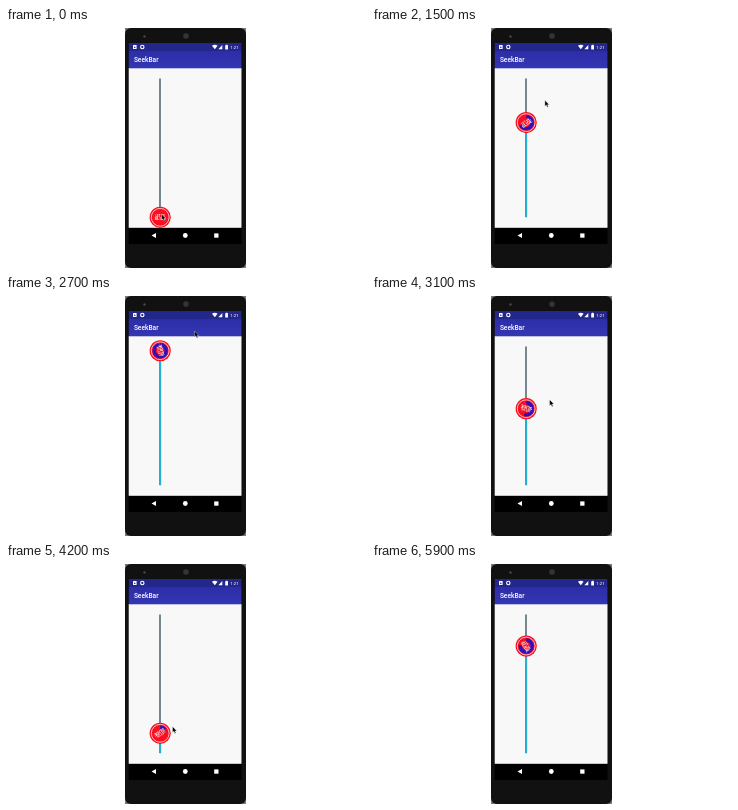
Recreate the animation shown at these times as an HTML page. Size 360 by 240 pixels, loop 6 s.

```html
<!DOCTYPE html>
<html lang="en">
<head>
<meta charset="utf-8">
<title>SeekBar</title>
<style>
  html, body { margin: 0; width: 100%; height: 100%; overflow: hidden; background: #fff; }
  svg { display: block; width: 360px; height: 240px; }
  text { font-family: Roboto, sans-serif; fill: #fff; }
</style>
</head>
<body>
<svg viewBox="0 0 360 240">
  <defs>
    <linearGradient id="bar" x2="0" y2="1">
      <stop offset="0" stop-color="#2d2da8"/>
      <stop offset="1" stop-color="#3337b3"/>
    </linearGradient>
  </defs>

  <!-- phone -->
  <rect x="119" width="121" height="240" fill="#777"/>
  <rect x="119" width="121" height="240" rx="6" fill="#111"/>
  <circle cx="138.500" cy="8.500" r="1.200" fill="#484848"/>
  <circle cx="180" cy="8" r="2.800" fill="#343434"/>
  <rect x="122.700" y="15" width="112.800" height="201" fill="#000"/>
  <rect x="122.700" y="40" width="112.800" height="159.800" fill="#f8f8f8"/>
  <rect x="122.700" y="15" width="112.800" height="8" fill="#23278c"/>
  <rect x="122.700" y="23" width="112.800" height="17.300" fill="url(#bar)"/>
  <text x="127.900" y="33.900" font-size="6.600" font-weight="500">SeekBar</text>

  <!-- status icons -->
  <g fill="#fff">
    <rect x="127" y="17" width="3.600" height="4" rx=".5"/>
    <path d="M128 20L128.800 18L129.600 20Z" fill="#23278c"/>
    <circle cx="136.300" cy="19" r="1.700" fill="none" stroke="#fff" stroke-width="1.100"/>
    <path d="M206 17.800Q208.800 15.700 211.600 17.800L208.800 21.300Z"/>
    <path d="M212.300 21.300L216.300 17V21.300Z"/>
    <path d="M219.200 17.300H220V16.700H221.300V17.300H222V21.400H219.200Z"/>
    <text x="224.300" y="20.900" font-size="4.400">1:21</text>
  </g>

  <!-- navigation -->
  <g fill="#fff">
    <path d="M145.500 207.500L150 205V210Z"/>
    <circle cx="179.300" cy="207.500" r="2.400"/>
    <rect x="208.200" y="205.400" width="4.300" height="4.300"/>
  </g>

  <!-- seek bar -->
  <path d="M154 50.500V189" stroke="#3f5663" stroke-width="1.400"/>
  <path id="fill" stroke="#25afd2" stroke-width="1.900"/>
  <g id="thumb">
    <circle r="10.600" fill="#f90f20"/>
    <circle r="8.900" fill="none" stroke="#fff" stroke-width=".7"/>
    <circle id="arc" r="6" fill="none" stroke="#3010bc" stroke-width="3.400"
      pathLength="100" transform="rotate(-90)"/>
    <g id="label" text-anchor="middle" font-weight="700">
      <text y="-.5" font-size="2.900">LET US</text>
      <text y="2.900" font-size="4.300">SLIDE</text>
    </g>
  </g>
  <path id="cursor" d="M0 0V6L1.400 4.800L2.400 7L3.400 6.500L2.500 4.400H4.300Z"
    fill="#000" stroke="#fff" stroke-width=".35"/>
</svg>

<script>
  const LOOP = 6000, STEP = 100, TURN = 10;
  const BAR = { x: 154.2, bottom: 189.3, length: 138 };

  // Turning points of the drag: time, percent, pointer x and y
  const drag = [
    [900, 0, 155.5, 186],
    [1100, 4.5, 154.5, 163],
    [1900, 90, 179, 42],
    [2700, 97.5, 188.5, 35],
    [3500, 41.5, 174, 126.5],
    [3900, 0, 169, 185],
    [4200, 14.5, 166.5, 162.5],
    [5900, 77.7, 157, 82]
  ];

  const $ = id => document.getElementById(id);
  const set = (id, name, value) => $(id).setAttribute(name, value);
  const show = (id, on) => $(id).style.visibility = on ? "visible" : "hidden";
  const easeOut = u => 1 - (1 - u) ** 2;

  function pose(t) {
    const next = Math.max(1, drag.findIndex(k => k[0] >= t));
    const a = drag[next - 1], b = drag[next];
    const u = easeOut(Math.max(0, (t - a[0]) / (b[0] - a[0])));
    return a.map((v, i) => v + (b[i] - v) * u).slice(1);
  }

  function draw(now) {
    const t = Math.floor((now % LOOP) / STEP) * STEP;
    const [percent, px, py] = pose(t);
    const y = BAR.bottom - percent / 100 * BAR.length;

    set("thumb", "transform", `translate(${BAR.x} ${y})`);
    set("label", "transform", `rotate(${percent * TURN})`);
    set("arc", "stroke-dasharray", `${percent} 200`);
    set("fill", "d", `M${BAR.x} ${y}V${BAR.bottom}`);
    set("cursor", "transform", `translate(${px} ${py})`);
    show("arc", percent > 0);
    show("cursor", t < 5700);
  }

  const start = performance.now();
  function tick() {
    draw(performance.now() - start);
    requestAnimationFrame(tick);
  }
  tick();
</script>
</body>
</html>
```
